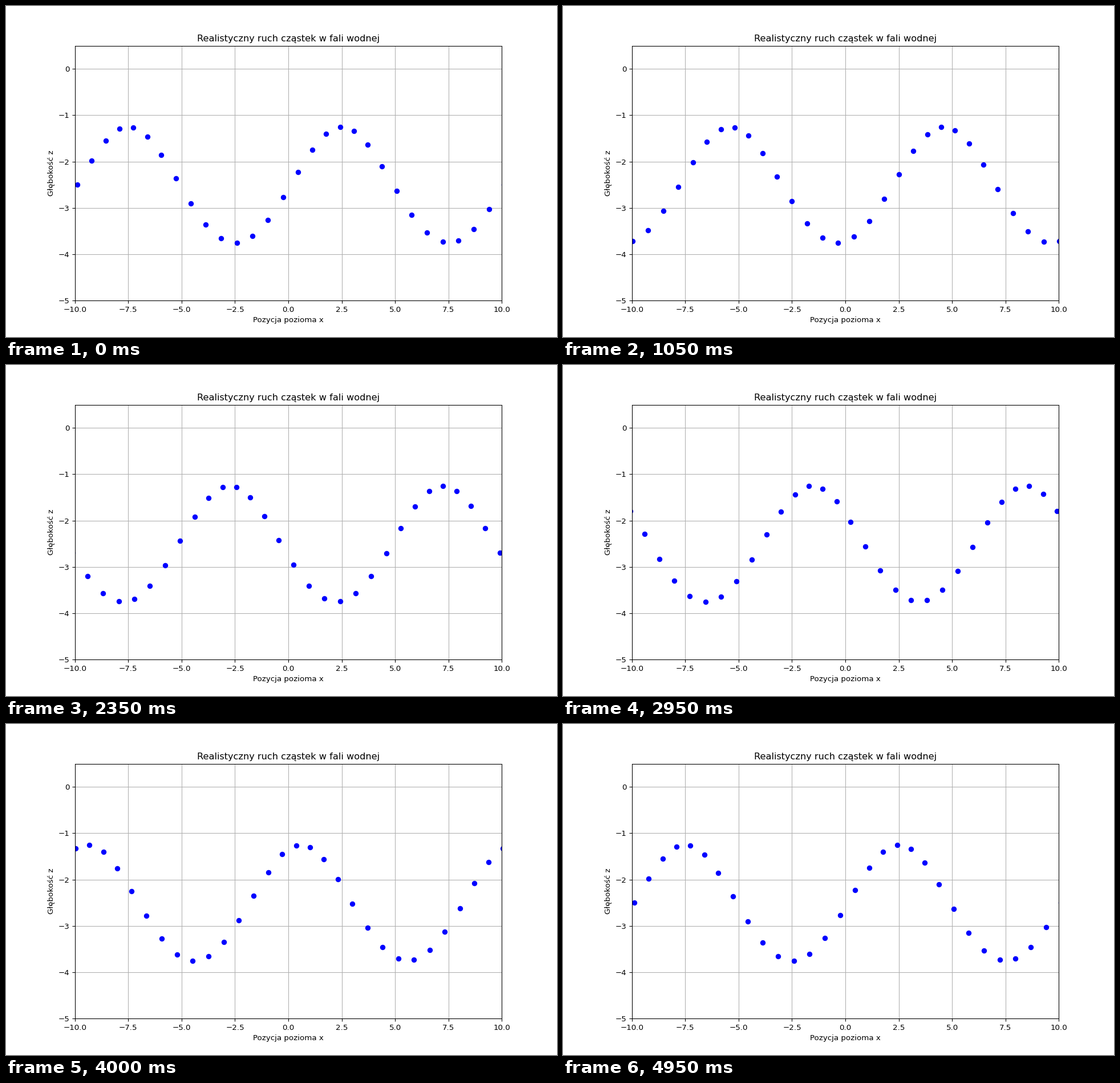
These frames come from a looping animation (966 px wide and 580 px high, 5 s). A matplotlib script:

```python
import numpy as np
import matplotlib.pyplot as plt
from matplotlib.animation import FuncAnimation

WIDTH, HEIGHT, DPI = 966, 580, 96.6
EPS = 1e-6  # keeps the pixel size from being rounded down
FRAMES, INTERVAL = 100, 50

K = 2 * np.pi / 10               # wave number for a wavelength of 10
DEPTH = -2.5                     # rest depth of the particles
AMP_X = 0.5 * np.exp(K * DEPTH)  # decays with depth
AMP_Z = 1.25

rest_x = np.linspace(-10, 10, 30)
phases = np.linspace(0, 2 * np.pi, FRAMES)  # both ends included

plt.rcParams["font.family"] = "DejaVu Sans"
fig, ax = plt.subplots(figsize=((WIDTH + EPS) / DPI, (HEIGHT + EPS) / DPI),
                       dpi=DPI)
ax.set_xlim(-10, 10)
ax.set_ylim(-5, 0.5)
ax.set_title("Realistyczny ruch cząstek w fali wodnej")
ax.set_xlabel("Pozycja pozioma x")
ax.set_ylabel("Głębokość z")
ax.grid(True)
particles, = ax.plot([], [], "bo")


def update(frame):
    theta = K * (rest_x - rest_x[0]) - phases[frame]
    particles.set_data(rest_x + AMP_X * np.cos(theta),
                       DEPTH + AMP_Z * np.sin(theta))
    return particles,


anim = FuncAnimation(fig, update, frames=FRAMES, interval=INTERVAL,
                     repeat=True, repeat_delay=0)
plt.show()
```
